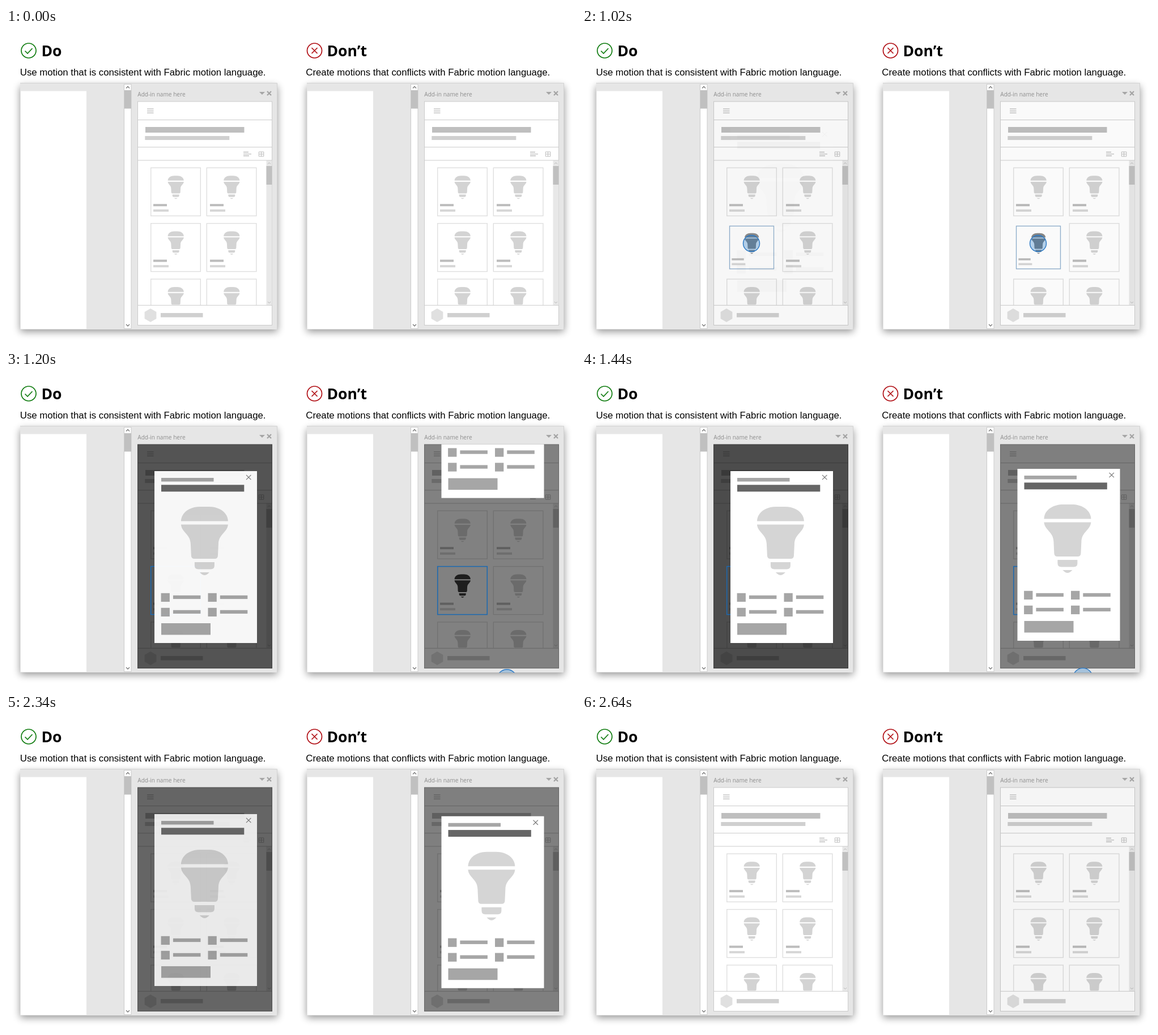
These frames come from a looping animation (1006 by 557 pixels, 3690 ms). An HTML page:

```html
<!DOCTYPE html>
<html lang="en">
<head>
<meta charset="utf-8">
<title>Motion: do and don't</title>
<style>
  html, body { margin: 0; height: 100%; overflow: hidden; background: #fff; }
  svg { display: block; width: 1006px; height: 557px; }
  .title { font: 700 26.5px "Open Sans", "Noto Sans", sans-serif; }
  .note { font: 16.8px "Liberation Sans", Arial, sans-serif; }
  .name { font: 10.1px "Open Sans", "Noto Sans", sans-serif; fill: #8e8e8e; }
  .line { fill: none; stroke: #cbcbcb; }
  .badge { fill: none; stroke-width: 1.7; }
  .highlight rect { fill: none; stroke: #1c6ab3; stroke-width: 1.5; }
  .cursor { fill: rgba(0, 100, 190, .28); stroke: #2a78c4; stroke-width: 1.4; }
</style>
</head>
<body>
<svg id="stage" viewBox="0 0 1006 557">
  <defs>
    <filter id="blur" x="-10%" y="-10%" width="120%" height="120%">
      <feGaussianBlur stdDeviation="7"/>
    </filter>
    <clipPath id="frameClip"><rect x="25" y="97" width="454" height="436.5"/></clipPath>
    <clipPath id="paneClip"><rect x="232" y="129.5" width="238" height="396.5"/></clipPath>
    <clipPath id="listClip"><rect x="233" y="235" width="227" height="255"/></clipPath>
    <path id="bulb" d="M-41.5 25.5C-41 10-26 0-8 0H8C26 0 41 10 41.5 25.5Z
      M-41.5 31.5H41.5C40 46 25 48 24.5 66L23.5 87Q23 92 18 92H-18Q-23 92-23.5 87L-24.5 66C-25 48-40 46-41.5 31.5Z
      M-17.5 98H17.5V104Q17.5 110.5 11 110.5H-11Q-17.5 110.5-17.5 104Z
      M-8.5 116H8.5Q4 121 0 121T-8.5 116Z"/>
  </defs>
  <g class="badge" stroke="#107c10">
    <circle cx="40" cy="40" r="13"/><path d="M33.5 40.5l4.5 4.5 8.5-9"/>
  </g>
  <g class="badge" stroke="#b00e14">
    <circle cx="544.5" cy="40" r="13"/><path d="M539.5 35l10 10m0-10l-10 10"/>
  </g>
  <text class="title" x="62.5" y="49.5">Do</text>
  <text class="title" x="566.5" y="49.5">Don’t</text>
  <text class="note" x="24.8" y="83.5">Use motion that is consistent with Fabric motion language.</text>
  <text class="note" x="529.3" y="83.5">Create motions that conflicts with Fabric motion language.</text>
</svg>
<script>
const LOOP = 3690, STEP = 30, LAST = 2640;
const SIDE_GAP = 506;

const rect = (x, y, w, h, fill) =>
  `<rect x="${x}" y="${y}" width="${w}" height="${h}" fill="${fill}"/>`;
const path = (d, color, width = 1) =>
  `<path d="${d}" fill="none" stroke="${color}" stroke-width="${width}"/>`;
const bulb = (x, y, scale, fill) =>
  `<use href="#bulb" transform="translate(${x} ${y}) scale(${scale})" fill="${fill}"/>`;

function card(col, row) {
  const x = 255.7 + col * 98.6, y = 247.2 + row * 98.4;
  const textX = x + 4.3 + col * 1.4;
  return `<g${col === 0 && row === 1 ? ' class="pressed"' : ""}>
    <rect x="${x}" y="${y}" width="87.6" height="85" fill="none" stroke="#dfdfdf" stroke-width="1.4"/>
    ${bulb(x + 44, y + 14, .34, "#d3d3d3")}
    ${rect(textX, y + 64, 24, 4, "#bcbcbc")}
    ${rect(textX, y + 73.6, 27, 4, "#d6d6d6")}
  </g>`;
}

function frame() {
  return `
    <rect x="25" y="103" width="454" height="434" fill="#000" opacity=".42" filter="url(#blur)"/>
    ${rect(25, 97, 454, 436, "#e6e6e6")}
    ${path("M25 97.5H478.5V533", "#d2d2d2")}
    ${rect(26, 111.5, 116, 420.5, "#fff")}
    <rect x="208.5" y="99.5" width="12.5" height="432" fill="#fff" stroke="#cbcbcb"/>
    ${rect(209, 110, 12, 32.5, "#c0c0c0")}
    ${path("M212 106.5l3-3 3 3M212 524l3 3 3-3", "#777", 1.3)}
    <text class="name" x="232.3" y="121.3">Add-in name here</text>
    <path d="M447 113h10l-5 5z" fill="#a6a6a6"/>
    ${path("M461 112l7 7m0-7l-7 7", "#a3a3a3", 2.2)}`;
}

function pane() {
  const cards = [0, 1, 2].map(row => card(0, row) + card(1, row)).join("");
  return `
    <rect class="line" x="232.5" y="130" width="237" height="395.5" style="fill:#fff"/>
    ${path("M249 143.2h11.5M249 146.7h11.5M249 150.2h11.5", "#b8b8b8", 1.3)}
    ${rect(246, 175, 174.5, 10, "#bfbfbf")}
    ${rect(245.3, 191, 149, 7, "#d0d0d0")}
    ${path("M419 219.5h9M419 222.8h14M419 226h10", "#bdbdbd", 1.3)}
    ${path("M446.3 219h8.5v8h-8.5zM450.5 219v8M446.3 223h8.5", "#bdbdbd")}
    <g clip-path="url(#listClip)">${cards}</g>
    ${rect(459.5, 234, 10, 256, "#e8e8e8")}
    ${rect(459.5, 244, 10, 33, "#c0c0c0")}
    ${path("M462 240.5l2.5-2.5 2.5 2.5M462 484l2.5 2.5 2.5-2.5", "#b5b5b5")}
    <path class="line" d="M232.5 162.5h237M232.5 210.7h237M232.5 234h237M232.5 490.3h237"/>
    <path d="M255 496l10.4 6v12l-10.4 6-10.4-6v-12z" fill="#e0e0e0"/>
    ${rect(273, 504, 74.5, 7.5, "#d0d0d0")}`;
}

function dialog() {
  const option = (x, y) =>
    rect(x, y, 15.3, 15.3, "#a6a6a6") + rect(x + 21.3, y + 4, 48.5, 6.3, "#a6a6a6");
  return `
    ${rect(262, 177, 181, 304, "#fff")}
    ${rect(274, 189, 92.5, 6.5, "#a6a6a6")}
    ${rect(274, 201.3, 146.3, 12, "#666")}
    ${path("M424 183.8l8.4 8.4m0-8.4l-8.4 8.4", "#777", 1.2)}
    ${bulb(350.4, 240, 1, "#d5d5d5")}
    ${option(273.6, 392.8)}${option(356.5, 392.8)}
    ${option(273.6, 418.8)}${option(356.5, 418.8)}
    ${rect(274, 446, 87, 20.5, "#a6a6a6")}`;
}

function makeSide(offset) {
  const root = document.createElementNS("http://www.w3.org/2000/svg", "g");
  root.setAttribute("transform", `translate(${offset} 0)`);
  root.innerHTML = `${frame()}${pane()}
    <g class="shade">${rect(232, 129.5, 238, 396.5, "#000")}</g>
    <g class="highlight">
      <rect x="255.7" y="345.6" width="87.6" height="85"/>
      ${bulb(299.7, 359.6, .34, "#1e1e1e")}
    </g>
    <g clip-path="url(#paneClip)"><g class="dialog">${dialog()}</g></g>
    <g clip-path="url(#frameClip)"><circle class="cursor" r="17.3"/></g>`;
  document.getElementById("stage").append(root);
  const find = name => root.querySelector("." + name);
  return {
    pressed: find("pressed"), shade: find("shade"), highlight: find("highlight"),
    dialog: find("dialog"), cursor: find("cursor")
  };
}

// Smooth 0 to 1 between two times.
function ramp(t, from, to) {
  const u = Math.min(1, Math.max(0, (t - from) / (to - from)));
  return u * u * (3 - 2 * u);
}
const bump = (t, a, b, c, d) => ramp(t, a, b) - ramp(t, c, d);
const mix = (a, b, u) => a + (b - a) * u;

const set = (el, attrs) => {
  for (const name in attrs) el.setAttribute(name, attrs[name]);
};

function drawCard(side, t) {
  const scale = 1 - .11 * bump(t, 930, 1015, 1040, 1160);
  const transform = `translate(299.5 388) scale(${scale}) translate(-299.5 -388)`;
  set(side.pressed, { transform });
  set(side.highlight, { transform, opacity: bump(t, 950, 1110, 1600, 1800) });
}

// The cursor selects a card first, then comes back to close the dialog.
function drawCursor(side, t, closing) {
  let x, y, press, opacity;
  if (t < 1200) {
    const u = ramp(t, 600, 930);
    x = mix(285, 299, u);
    y = mix(553, 381, u);
    press = bump(t, 930, 1015, 1040, 1130);
    opacity = 1 - ramp(t, 1090, 1180);
  } else {
    x = mix(closing.x[0], closing.x[1], ramp(t, ...closing.xTime));
    y = mix(closing.y[0], closing.y[1], ramp(t, ...closing.yTime));
    press = bump(t, 2160, 2220, 2235, 2300);
    opacity = 1 - ramp(t, 2240, 2320);
  }
  set(side.cursor, { cx: x, cy: y, r: 17.3 - 2.8 * press, opacity });
}

const good = makeSide(0), bad = makeSide(SIDE_GAP);
const goodClosing = { x: [285, 428], xTime: [1830, 2160], y: [553, 188], yTime: [1680, 2150] };
const badClosing = { x: [378, 429], xTime: [1600, 2150], y: [545, 184], yTime: [1415, 1945] };

function draw(t) {
  drawCard(good, t);
  drawCard(bad, t);
  drawCursor(good, t, goodClosing);
  drawCursor(bad, t, badClosing);

  const fade = bump(t, 990, 1230, 2280, 2540);
  set(good.shade, { opacity: .7 * fade });
  set(good.dialog, { opacity: fade });

  const drop = -360 + 360 * ramp(t, 1092, 1390) + 385 * ramp(t, 2313, 2633);
  set(bad.shade, { opacity: .5 * bump(t, 995, 1215, 2400, 2690) });
  set(bad.dialog, { transform: `translate(.5 ${drop - 4})` });
}

// Poses advance in fixed steps and the last one holds until the loop restarts.
const start = performance.now();
function tick() {
  const t = (performance.now() - start) % LOOP;
  draw(Math.min(LAST, Math.floor(t / STEP) * STEP));
  requestAnimationFrame(tick);
}
tick();
</script>
</body>
</html>
```
